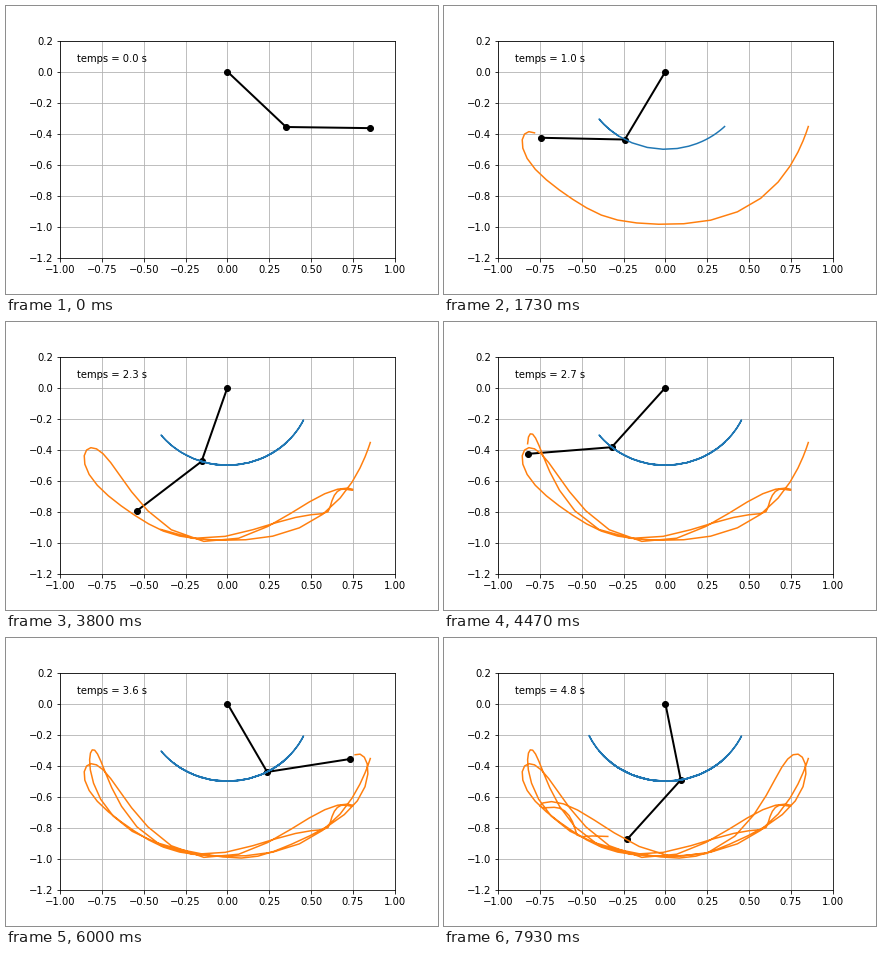
A matplotlib script that plays this animation: 432 by 288 pixels, repeating every 8 s.

```python
import numpy as np
import matplotlib.pyplot as plt
from matplotlib.animation import FuncAnimation

# Double pendulum made of two equal uniform rods
G, L = 9.81, 0.5
DT, SUBSTEPS = 0.04, 20
FRAMES, LOOP_MS = 120, 8000


def derivs(state):
    a, b, wa, wb = state
    c, s = np.cos(a - b), np.sin(a - b)
    k = G / L
    p = -1.125 * k * np.sin(a) - 0.375 * s * wb**2
    q = -1.5 * k * np.sin(b) + 1.5 * s * wa**2
    acc_a = (p - 0.375 * c * q) / (1 - 0.5625 * c**2)
    return np.array([wa, wb, acc_a, q - 1.5 * c * acc_a])


def rk4(state, h):
    k1 = derivs(state)
    k2 = derivs(state + h / 2 * k1)
    k3 = derivs(state + h / 2 * k2)
    k4 = derivs(state + h * k3)
    return state + h / 6 * (k1 + 2 * k2 + 2 * k3 + k4)


def simulate(count):
    state = np.array([np.pi / 4, np.pi / 2, 0.0, 0.0])
    angles = [state[:2]]
    for _ in range(count):
        for _ in range(SUBSTEPS):
            state = rk4(state, DT / SUBSTEPS)
        angles.append(state[:2])
    return np.array(angles).T


th1, th2 = simulate(FRAMES)
x1, y1 = L * np.sin(th1), -L * np.cos(th1)
x2, y2 = x1 + L * np.sin(th2), y1 - L * np.cos(th2)

plt.rcParams["font.family"] = "DejaVu Sans"
fig = plt.figure(figsize=(6, 4), dpi=72, facecolor="white")
ax = fig.add_axes([0.125, 0.125, 0.775, 0.755])
ax.set_xlim(-1, 1)
ax.set_ylim(-1.2, 0.2)
ax.set_xticks(np.arange(-1, 1.01, 0.25))
ax.set_yticks(np.linspace(-1.2, 0.2, 8))
ax.grid()

rods, = ax.plot([], [], "o-", color="k", lw=2)
trail1, = ax.plot([], [], color="C0", lw=1.5)
trail2, = ax.plot([], [], color="C1", lw=1.5)
label = ax.text(0.05, 0.9, "", transform=ax.transAxes)


def update(frame):
    i = frame + 1
    rods.set_data([0, x1[i], x2[i]], [0, y1[i], y2[i]])
    trail1.set_data(x1[:i], y1[:i])
    trail2.set_data(x2[:i], y2[:i])
    label.set_text(f"temps = {i * DT:.1f} s")
    return rods, trail1, trail2, label


anim = FuncAnimation(fig, update, frames=FRAMES, interval=LOOP_MS / FRAMES,
                     init_func=lambda: update(0), repeat=True, repeat_delay=0)
plt.show()
```
